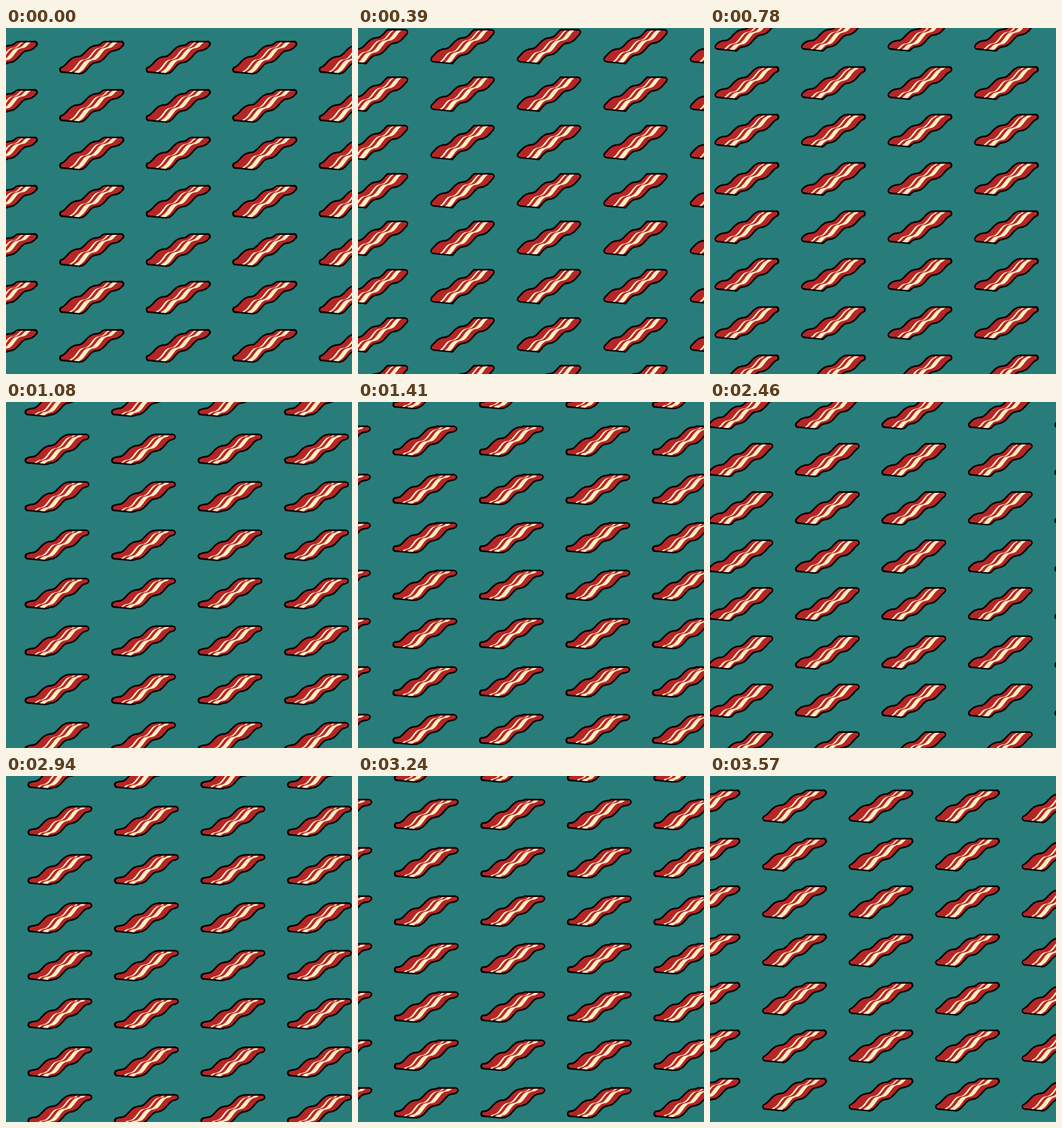
Write an HTML page with a canvas that moves like this. It is 480x480 px and loops after 3.6 s.

```html
<!DOCTYPE html>
<html>
<head>
<meta charset="utf-8">
<style>
html, body { margin: 0; height: 100%; overflow: hidden; background: #287d7b; }
canvas { display: block; }
</style>
</head>
<body>
<canvas id="stage" width="480" height="480"></canvas>
<script>
const ctx = document.getElementById('stage').getContext('2d');
const LOOP = 3600, STEP = 30, FRAMES = LOOP / STEP;
const CELL_W = 120, CELL_H = 200 / 3;
const WAVES = 2.25, AMPLITUDE = 2;
const RED = '#b72626', CREAM = '#fbf0c6', TEAL = '#287d7b';

// Point on the strip: u runs across its width, s along its length.
function stripPoint(u, s, cycle) {
  const along = Math.min(1, Math.max(0, s));
  const wave = AMPLITUDE * Math.cos(2 * Math.PI * (cycle - WAVES * along));
  return [
    136.5 - 58 * s + u * (23 + 2 * s),
    21.2 + 34.8 * s + 2.3 * u * s + wave
  ];
}

// Lengthwise band whose position drifts across the strip by `drift`;
// `extra` lengthens it past both ends.
function band(u, width, drift, extra, cycle) {
  const path = new Path2D(), n = 40;
  const add = (offset, i) => {
    const t = i / n;
    path.lineTo(...stripPoint(u + offset + drift * t, t * (1 + 2 * extra) - extra, cycle));
  };
  for (let i = 0; i <= n; i++) add(0, i);
  for (let i = n; i >= 0; i--) add(width, i);
  path.closePath();
  return path;
}

function stroke(path, color, width, dash = []) {
  ctx.strokeStyle = color;
  ctx.lineWidth = width;
  ctx.setLineDash(dash);
  ctx.stroke(path);
}

function drawStrip(body, stripes) {
  ctx.lineJoin = 'round';
  stroke(body, '#000', 8.4);
  stroke(body, '#000', 9.6, [1, 1]); // toothed edge
  stroke(body, RED, 4.6);
  ctx.fillStyle = RED;
  ctx.fill(body);
  ctx.fillStyle = CREAM;
  stripes.forEach(stripe => ctx.fill(stripe));
}

function draw(now) {
  const frame = Math.floor((now % LOOP) / STEP);
  const cycle = (frame - 50) / 60;
  const body = band(0, 1, 0, 0, cycle);
  const stripes = [band(0.05, 0.11, 0.45, 0.06, cycle), band(0.36, 0.27, 0.42, 0.06, cycle)];
  const dx = (2 * frame) % CELL_W;
  const dy = -((2 * CELL_H * frame / FRAMES) % CELL_H);

  ctx.fillStyle = TEAL;
  ctx.fillRect(0, 0, 480, 480);
  for (let row = -1; row <= 8; row++) {
    for (let col = -2; col <= 4; col++) {
      ctx.save();
      ctx.translate(dx + col * CELL_W, Math.round(dy + row * CELL_H));
      drawStrip(body, stripes);
      ctx.restore();
    }
  }
}

const start = performance.now();
function tick() {
  draw(performance.now() - start);
  requestAnimationFrame(tick);
}
tick();
</script>
</body>
</html>
```
